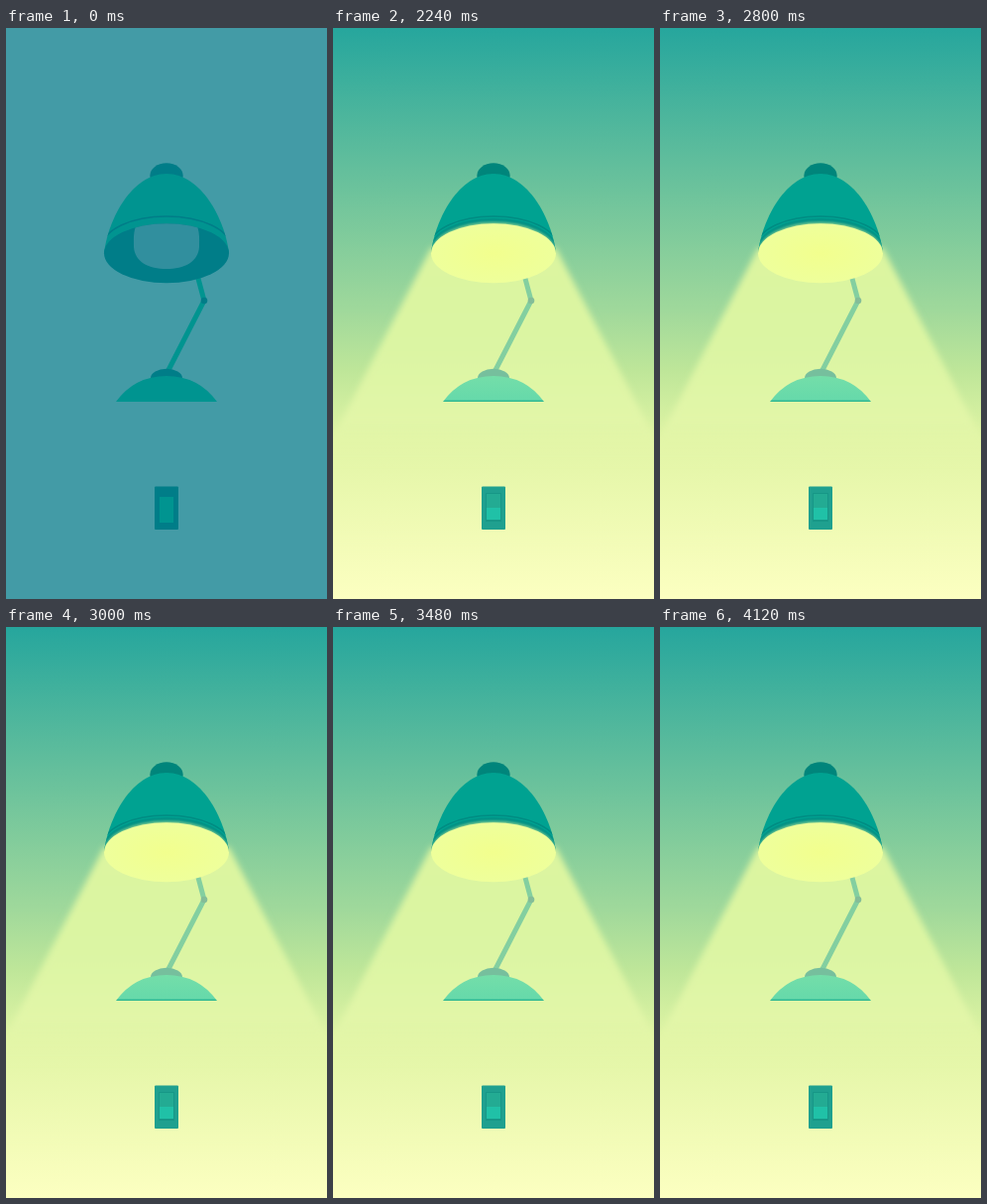
An HTML page that plays this animation: 324x576 px, repeating every 4.16 s.

```html
<!DOCTYPE html>
<html lang="en">
<head>
<meta charset="utf-8">
<title>Desk lamp</title>
<style>
  html, body { margin: 0; width: 100%; height: 100%; overflow: hidden; }
  svg {
    display: block; width: 100vw; height: 100vh;
    --wall: #439ba6; --shade: #009490; --cap: #007d88; --lip: #007d88;
    --rim: #007d88; --arm: #009490; --joint: #007d88;
    --foot: #009490; --hub: #007d88; --plate: #007d88; --key: #009490;
  }
  svg.on {
    --wall: url(#sky); --shade: #00a291; --cap: #00857b; --lip: #008c83;
    --rim: url(#glow); --arm: #83cfa0; --joint: #84bd98;
    --foot: url(#footLit); --hub: #76bf9d; --plate: #1fa08f; --key: #23ab93;
  }
  .lit { display: none; }
  .on .lit { display: inline; }
  .on .unlit { display: none; }
</style>
</head>
<body>
<svg id="lamp" viewBox="0 0 324 576" preserveAspectRatio="none">
  <defs>
    <linearGradient id="sky" x2="0" y2="1">
      <stop offset="0" stop-color="#26a69d"/>
      <stop offset=".25" stop-color="#64bf9c"/>
      <stop offset=".5" stop-color="#a1d99b"/>
      <stop offset=".6" stop-color="#bee699"/>
      <stop offset=".72" stop-color="#e1f5a5"/>
      <stop offset="1" stop-color="#fcffc1"/>
    </linearGradient>
    <linearGradient id="beam" gradientUnits="userSpaceOnUse" x1="0" y1="220" x2="0" y2="440">
      <stop offset="0" stop-color="#dcf59f"/>
      <stop offset=".45" stop-color="#dbf5a3"/>
      <stop offset=".8" stop-color="#e2f6a8"/>
      <stop offset="1" stop-color="#e7f7ab" stop-opacity="0"/>
    </linearGradient>
    <radialGradient id="glow">
      <stop offset="0" stop-color="#f2ff8e"/>
      <stop offset="1" stop-color="#eeff9b"/>
    </radialGradient>
    <linearGradient id="footLit" x2="0" y2="1">
      <stop offset="0" stop-color="#74dea9"/>
      <stop offset=".92" stop-color="#66d9aa"/>
      <stop offset=".97" stop-color="#2fb892"/>
    </linearGradient>
    <filter id="soft" x="-20%" y="-20%" width="140%" height="140%">
      <feGaussianBlur stdDeviation="3"/>
    </filter>
    <filter id="halo" x="-20%" y="-20%" width="140%" height="140%">
      <feGaussianBlur stdDeviation="1.8"/>
    </filter>
    <clipPath id="opening"><ellipse cx="162" cy="227.2" rx="63" ry="30"/></clipPath>
    <path id="dome" d="M99 227C103 193 127 147 162 147S221 193 225 227Z"/>
    <clipPath id="domeClip"><use href="#dome"/></clipPath>
  </defs>

  <rect width="324" height="576" fill="var(--wall)"/>
  <path class="lit" d="M99 222L-15 441H339L225 222Z" fill="url(#beam)" filter="url(#soft)"/>

  <g fill="none" stroke="var(--arm)" stroke-width="5">
    <path d="M193 249L200 275L162 349"/>
  </g>
  <circle cx="200" cy="275" r="3.3" fill="var(--joint)"/>
  <ellipse cx="162" cy="353" rx="16" ry="9.3" fill="var(--hub)"/>
  <path d="M111 377Q130 351 162 351T213 377Z" fill="var(--foot)"/>

  <ellipse cx="162" cy="149" rx="16.7" ry="12.7" fill="var(--cap)"/>
  <use href="#dome" fill="var(--shade)"/>
  <g clip-path="url(#domeClip)">
    <ellipse cx="162" cy="220" rx="64" ry="30" fill="none" stroke="var(--lip)" stroke-width="1.6"/>
    <g class="lit">
      <ellipse cx="162" cy="223" rx="64" ry="31" fill="#008c83" opacity=".75"/>
      <ellipse cx="162" cy="227" rx="63" ry="31" fill="#c9ed98" opacity=".7" filter="url(#halo)"/>
    </g>
  </g>
  <ellipse cx="162" cy="227.2" rx="63" ry="30" fill="var(--rim)"/>
  <g class="unlit" clip-path="url(#opening)">
    <path d="M133 195C128 205 129 213 129 221C130 236 144 243 162 243S194 236 195 221C195 213 196 205 191 195Z" fill="#318f9e"/>
  </g>

  <rect x="150" y="462.5" width="24" height="43.5" rx="1" fill="var(--plate)"/>
  <rect class="unlit" x="155" y="473" width="14" height="26" fill="var(--key)"/>
  <g class="lit">
    <rect x="154" y="469" width="16" height="29" fill="#179787"/>
    <rect x="155" y="470" width="14" height="14" fill="var(--key)"/>
    <rect x="155" y="484" width="14" height="12" fill="#20c1a7"/>
  </g>
</svg>
<script>
  const LOOP = 4160, SWITCH_ON = 2000;
  const lamp = document.getElementById('lamp');
  const start = performance.now();

  function draw() {
    const time = (performance.now() - start) % LOOP;
    lamp.classList.toggle('on', time >= SWITCH_ON);
    requestAnimationFrame(draw);
  }
  draw();
</script>
</body>
</html>
```
